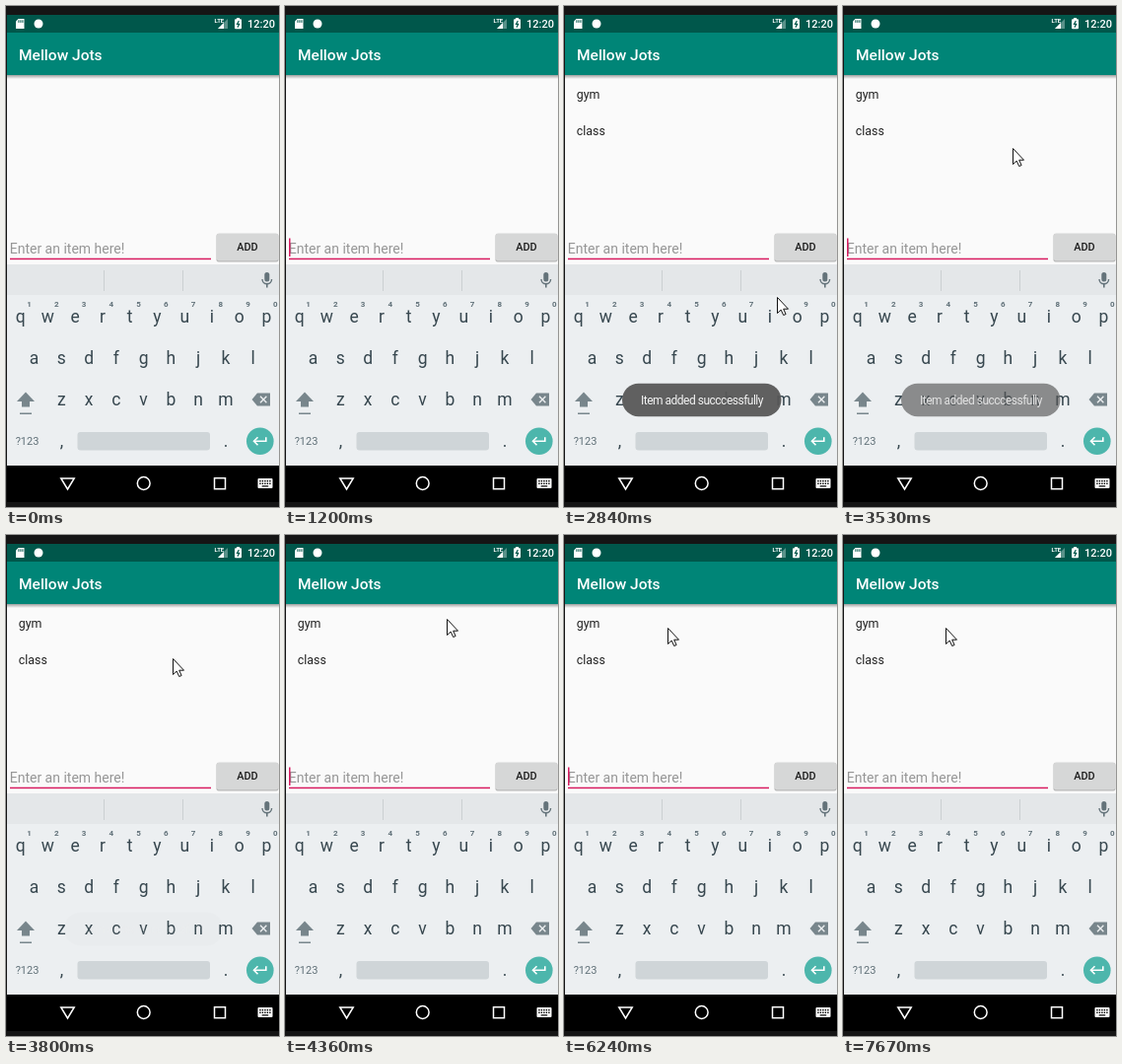
An HTML page with a canvas that plays this animation: 277 by 508 pixels, repeating every 8000 ms.

```html
<!DOCTYPE html>
<html lang="en">
<head>
<meta charset="utf-8">
<title>Task list</title>
<style>
html, body { margin: 0; width: 100%; height: 100%; overflow: hidden; background: #151515; }
canvas { display: block; width: 277px; height: 508px; }
</style>
</head>
<body>
<canvas id="stage"></canvas>
<script>
const W = 277, H = 508, LOOP = 8000;
const TAP = 2290;                 // ADD is tapped: items, toast and pointer appear
const BLINK = 485, FIRST_BLINK = 205;
const FADE_START = 3410, FADE_TIME = 400;
const KEY_STEP = 27.75;
const TEAL_DARK = '#00574b', PINK = '#d81b60', KEYS_BG = '#eceff1';
const KEY_INK = '#37474f', ICON = '#78868c', LABEL = '#607078';

// Pointer path: time, x, y
const PATH = [[TAP, 242, 247], [2840, 216, 295], [3140, 199, 340], [3530, 172, 144],
  [4360, 164, 85], [5970, 164, 85], [6240, 105, 94], [7390, 104, 94]];

const canvas = document.getElementById('stage');
const dpr = window.devicePixelRatio || 1;
canvas.width = W * dpr;
canvas.height = H * dpr;
const ctx = canvas.getContext('2d');
ctx.scale(dpr, dpr);

function pointerAt(t) {
  const next = PATH.findIndex(p => p[0] > t);
  if (next < 0) return PATH[PATH.length - 1].slice(1);
  const [t0, x0, y0] = PATH[next - 1], [t1, x1, y1] = PATH[next];
  const k = (t - t0) / (t1 - t0);
  return [Math.round(x0 + (x1 - x0) * k), Math.round(y0 + (y1 - y0) * k)];
}

// The tap restarts the blinking
function caretOn(t) {
  const origin = t < TAP ? FIRST_BLINK : TAP;
  return Math.floor((t - origin) / BLINK) % 2 === 0;
}

function toastAlpha(t) {
  if (t < TAP) return 0;
  return Math.min(1, Math.max(0, 1 - (t - FADE_START) / FADE_TIME));
}

function rect(x, y, w, h, fill) {
  ctx.fillStyle = fill;
  ctx.fillRect(x, y, w, h);
}

function pill(x, y, w, h, r, fill) {
  ctx.beginPath();
  ctx.roundRect(x, y, w, h, r);
  ctx.fillStyle = fill;
  ctx.fill();
}

function disc(x, y, r, fill) {
  ctx.beginPath();
  ctx.arc(x, y, r, 0, Math.PI * 2);
  ctx.fillStyle = fill;
  ctx.fill();
}

function arc(x, y, r, end, color, width) {
  ctx.beginPath();
  ctx.arc(x, y, r, 0, end);
  ctx.strokeStyle = color;
  ctx.lineWidth = width;
  ctx.stroke();
}

function trace(points, close) {
  ctx.beginPath();
  points.forEach(([x, y]) => ctx.lineTo(x, y));
  if (close) ctx.closePath();
}

function poly(points, fill) {
  trace(points, true);
  ctx.fillStyle = fill;
  ctx.fill();
}

function line(points, color, width, close) {
  trace(points, close);
  ctx.strokeStyle = color;
  ctx.lineWidth = width;
  ctx.stroke();
}

function text(str, x, y, size, color, weight = 400, align = 'left') {
  ctx.font = `${weight} ${size}px Roboto, sans-serif`;
  ctx.textAlign = align;
  ctx.fillStyle = color;
  ctx.fillText(str, x, y);
}

function textRow(str, x, y, step, size, color, weight) {
  [...str].forEach((c, i) => text(c, x + i * step, y, size, color, weight, 'center'));
}

// Right triangle with its corner at the lower right
const wedge = (x, y, size, fill) => poly([[x, y - size], [x, y], [x - size, y]], fill);

function statusBar() {
  rect(1, 9, 276, 19, TEAL_DARK);
  poly([[12.5, 13], [18.5, 13], [18.5, 23], [10, 23], [10, 15.5]], '#fff');
  for (let i = 0; i < 3; i++) rect(12.4 + i * 2, 14.3, 1, 2.6, TEAL_DARK);
  disc(33, 18, 4.5, '#fff');

  wedge(225, 23, 10, 'rgba(255,255,255,.35)');
  wedge(221, 23, 6, '#fff');
  text('LTE', 211.5, 17, 6, '#fff', 700);

  pill(232, 13.2, 7, 10, 1, '#fff');
  rect(234, 12, 3, 2, '#fff');
  line([[236.3, 15], [234.5, 18.4], [236.7, 18.4], [234.9, 21.6]], TEAL_DARK, 1.2);
  text('12:20', 273, 22, 11, '#fff', 500, 'right');
}

function appBar() {
  rect(1, 27, 276, 43, '#008577');
  text('Mellow Jots', 13, 55, 15.5, '#fff', 500);
  const shade = ctx.createLinearGradient(0, 70, 0, 74);
  shade.addColorStop(0, 'rgba(0,0,0,.36)');
  shade.addColorStop(1, 'rgba(0,0,0,0)');
  rect(1, 70, 276, 4, shade);
}

function inputRow(caret) {
  text('Enter an item here!', 3.7, 250.5, 14, '#969696');
  rect(4, 255.7, 204, 1.5, PINK);
  if (caret) rect(4, 235.5, 1.5, 18.5, PINK);
  pill(213.5, 231, 63, 28.4, 2, '#b9baba');
  pill(214, 230.5, 62, 27.8, 2, '#d6d7d7');
  text('ADD', 245, 248.3, 10.9, '#1c1c1c', 500, 'center');
}

function mic() {
  const ink = '#64737a';
  pill(262.3, 270, 5, 9.5, 2.5, ink);
  arc(264.8, 277, 4.8, Math.PI, ink, 1.4);
  rect(264, 281.5, 1.6, 4, ink);
}

function shiftKey(x, y) {
  poly([[x, y - 8], [x + 9, y + 1.5], [x - 9, y + 1.5]], ICON);
  rect(x - 4, y + 1, 8, 6, ICON);
  rect(x - 6, y + 13, 12, 1.5, ICON);
}

function deleteKey(x, y) {
  poly([[x - 5, y - 6.5], [x + 8, y - 6.5], [x + 8, y + 6.5], [x - 5, y + 6.5], [x - 10.5, y]], ICON);
  for (const s of [-1, 1]) line([[x - 2, y - 3.2 * s], [x + 4.4, y + 3.2 * s]], KEYS_BG, 1.4);
}

function enterKey(x, y) {
  disc(x, y, 13.8, '#4db6ac');
  line([[x + 6, y - 4], [x + 6, y], [x - 6, y]], '#fff', 1.6);
  line([[x - 2.3, y - 4], [x - 6.3, y], [x - 2.3, y + 4]], '#fff', 1.6);
}

function keyboard() {
  rect(1, 262, 276, 204, KEYS_BG);
  rect(1, 262, 276, 31, '#e4e7e9');
  for (const x of [99, 179]) rect(x, 268, 1, 21, '#cbd0d2');
  mic();

  ['qwertyuiop', 'asdfghjkl', 'zxcvbnm'].forEach((row, i) =>
    textRow(row, 14.7 + i * KEY_STEP * 0.5 + (i > 1 ? KEY_STEP / 2 : 0),
      320.6 + i * 42.3, KEY_STEP, 17.5, KEY_INK));
  textRow('1234567890', 23.6, 305, KEY_STEP, 8, LABEL, 700);

  shiftKey(20, 399.5);
  deleteKey(260, 399);
  text('?123', 21.5, 445, 11, LABEL, 400, 'center');
  text(',', 56.5, 447, 17.5, KEY_INK, 400, 'center');
  text('.', 223, 447, 17.5, KEY_INK, 400, 'center');
  pill(72.5, 432, 134.5, 18.5, 3, '#cfd5d8');
  enterKey(257.8, 441.3);
}

function navBar() {
  rect(1, 466, 276, 37, '#000');
  line([[55.8, 479], [69.2, 479], [62.5, 490]], '#fff', 1.5, true);
  arc(139.7, 484, 6.4, Math.PI * 2, '#fff', 1.5);
  ctx.strokeRect(211.5, 478.7, 11, 11);
  pill(255.5, 479, 15, 10, 1, '#fff');
  for (let i = 0; i < 10; i++) {
    rect(257.2 + (i % 5) * 2.5, 481 + Math.floor(i / 5) * 2.6, 1.4, 1.4, '#000');
  }
  rect(259.7, 486.3, 6.5, 1.2, '#000');
}

function toast(alpha) {
  ctx.globalAlpha = alpha;
  pill(59, 382.7, 161.5, 33.5, 16.7, 'rgba(88,88,88,.94)');
  ctx.globalAlpha = Math.sqrt(alpha);
  ctx.letterSpacing = '-0.5px';
  text('Item added succcessfully', 78, 404, 12, '#f4f4f4');
  ctx.letterSpacing = '0px';
  ctx.globalAlpha = 1;
}

function pointer([x, y]) {
  ctx.save();
  ctx.translate(x + 0.5, y + 0.5);
  ctx.lineJoin = 'round';
  const shape = [[0, 0], [0, 16], [3.7, 12.6], [6.2, 18], [8.6, 17], [6.2, 11.7], [11, 11.7]];
  poly(shape, '#fff');
  line(shape, '#111', 1, true);
  ctx.restore();
}

function draw(t) {
  rect(0, 0, W, H, '#151515');
  rect(1, 70, 276, 192, '#fafafa');
  statusBar();
  appBar();
  if (t >= TAP) ['gym', 'class'].forEach((s, i) => text(s, 12.8, 93.7 + i * 37, 12.4, '#212121'));
  inputRow(caretOn(t));
  keyboard();
  navBar();
  toast(toastAlpha(t));
  if (t >= TAP) pointer(pointerAt(t));
}

const start = performance.now();
function tick() {
  draw((performance.now() - start) % LOOP);
  requestAnimationFrame(tick);
}
draw(0);
requestAnimationFrame(tick);
</script>
</body>
</html>
```
